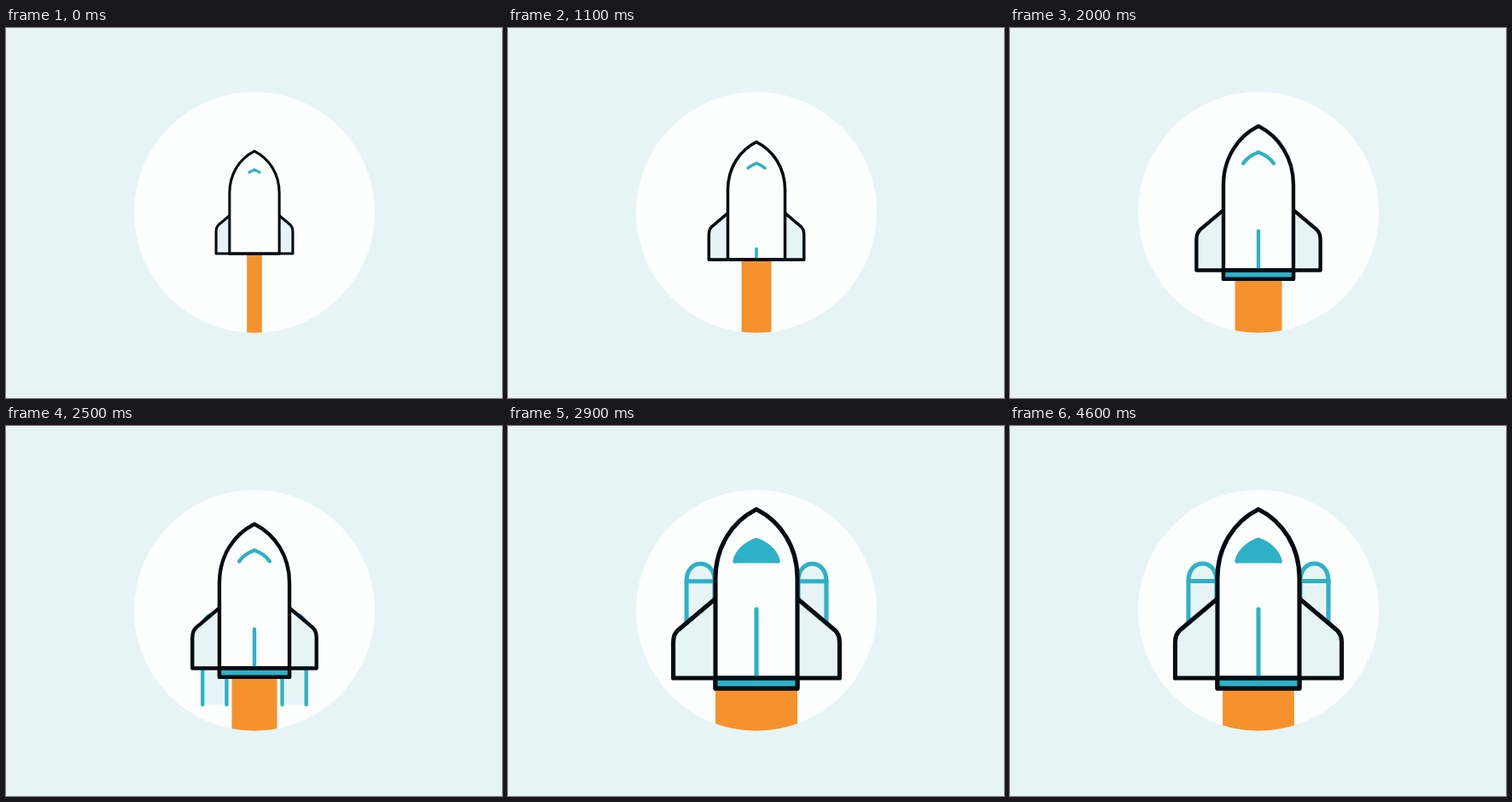
An HTML page for the animation above (4700 ms loop, 581 by 433 pixels).

```html
<!DOCTYPE html>
<html lang="en">
<head>
<meta charset="utf-8">
<title>Growing rocket</title>
<style>
  html, body { margin: 0; width: 100%; height: 100%; overflow: hidden; background: #e6f4f6; }
  svg { display: block; }
  .ink, .teal { stroke-width: 5.1; stroke-linecap: round; stroke-linejoin: round; }
  .ink { stroke: #050d12; }
  .teal { stroke: #2eb1c6; }
</style>
</head>
<body>
<svg width="581" height="433" viewBox="0 0 581 433" fill="none">
  <defs>
    <clipPath id="disc"><circle cx="291" cy="215.7" r="141"/></clipPath>
    <g id="side">
      <g id="booster" class="teal" fill="#e6f4f6">
        <path d="M209 285V181C209 168 217 161 225.5 161S242 168 242 181V285"/>
        <path d="M209 181.5H242"/>
      </g>
      <path id="fin" class="ink" fill="#e6f4f6" d="M270 179.3L199 239Q193.5 244 193.5 253V295H270"/>
    </g>
    <path id="brow" class="teal" pathLength="1" d="M291 133.5C281 137 269 145 266 158"/>
  </defs>
  <circle cx="291" cy="215.7" r="141" fill="#fdffff"/>
  <g clip-path="url(#disc)"><rect id="flame" height="140" fill="#f5922d"/></g>
  <g id="rocket">
    <use href="#side"/>
    <use href="#side" transform="translate(582) scale(-1 1)"/>
    <path id="hull" class="ink" fill="#fdffff"/>
    <rect id="skirt" class="ink" x="243" y="295" width="96" fill="#2eb1c6"/>
    <path id="window" class="teal" fill="#2eb1c6" d="M266 158C269 145 281 137 291 133.5C301 137 313 145 316 158Z"/>
    <use href="#brow"/>
    <use href="#brow" transform="translate(582) scale(-1 1)"/>
    <path id="seam" class="teal"/>
    <path class="ink" d="M243 295H339"/>
  </g>
</svg>
<script>
const LOOP = 4700, STEP = 100, CX = 291, CY = 216;
const $ = id => document.getElementById(id);
const set = (id, attrs) => {
  for (const name in attrs) $(id).setAttribute(name, attrs[name]);
};
const clamp = x => Math.min(1, Math.max(0, x));
const ease = x => x < .5 ? 4 * x ** 3 : 1 - 4 * (1 - x) ** 3;

// Growth runs from stage 0 to 3, one eased half-second step at a time.
const growth = t => [600, 1450, 2450].reduce((sum, start) => sum + ease(clamp((t - start) / 500)), 0);

// Interpolates a value given at each of the four stages.
const at = (stage, values) => {
  const i = Math.min(2, Math.floor(stage));
  return values[i] + (values[i + 1] - values[i]) * (stage - i);
};

function draw(t) {
  const stage = growth(t);
  const scale = at(stage, [.607, .698, .854, 1]);
  const skirt = 12 * clamp(stage - 1);
  const last = clamp(stage - 2);
  const pulse = 1 + .07 * Math.cos(2 * Math.PI * (t - 2900) / 686);
  const width = scale * at(stage, [28.7, 52.6, 66, 90]) * pulse;

  set('rocket', { transform: `translate(${CX} ${CY}) scale(${scale}) translate(${-CX} ${-CY})` });
  set('flame', { x: CX - width / 2, y: CY + scale * (295 + skirt - CY), width });
  set('fin', { transform: `translate(${at(stage, [23.5, 17.7, 12.5, 0])})` });
  set('booster', {
    transform: `translate(${11 * (1 - last)} ${60 * (1 - last)})`,
    visibility: last > 0 ? 'visible' : 'hidden'
  });
  set('hull', { d: `M243 ${295 + skirt}V178C243 142 262 112 291 97.5C320 112 339 142 339 178V${295 + skirt}Z` });
  set('skirt', { height: skirt });
  set('window', { opacity: last });
  set('brow', { 'stroke-dasharray': `${at(stage, [.31, .45, .72, 1])} 2` });
  set('seam', { d: `M291 295V${at(stage, [295, 276.5, 241.5, 214.5])}` });
}

const begin = performance.now();
function tick() {
  const t = (performance.now() - begin) % LOOP;
  draw(Math.floor(t / STEP) * STEP);
  requestAnimationFrame(tick);
}
tick();
</script>
</body>
</html>
```
